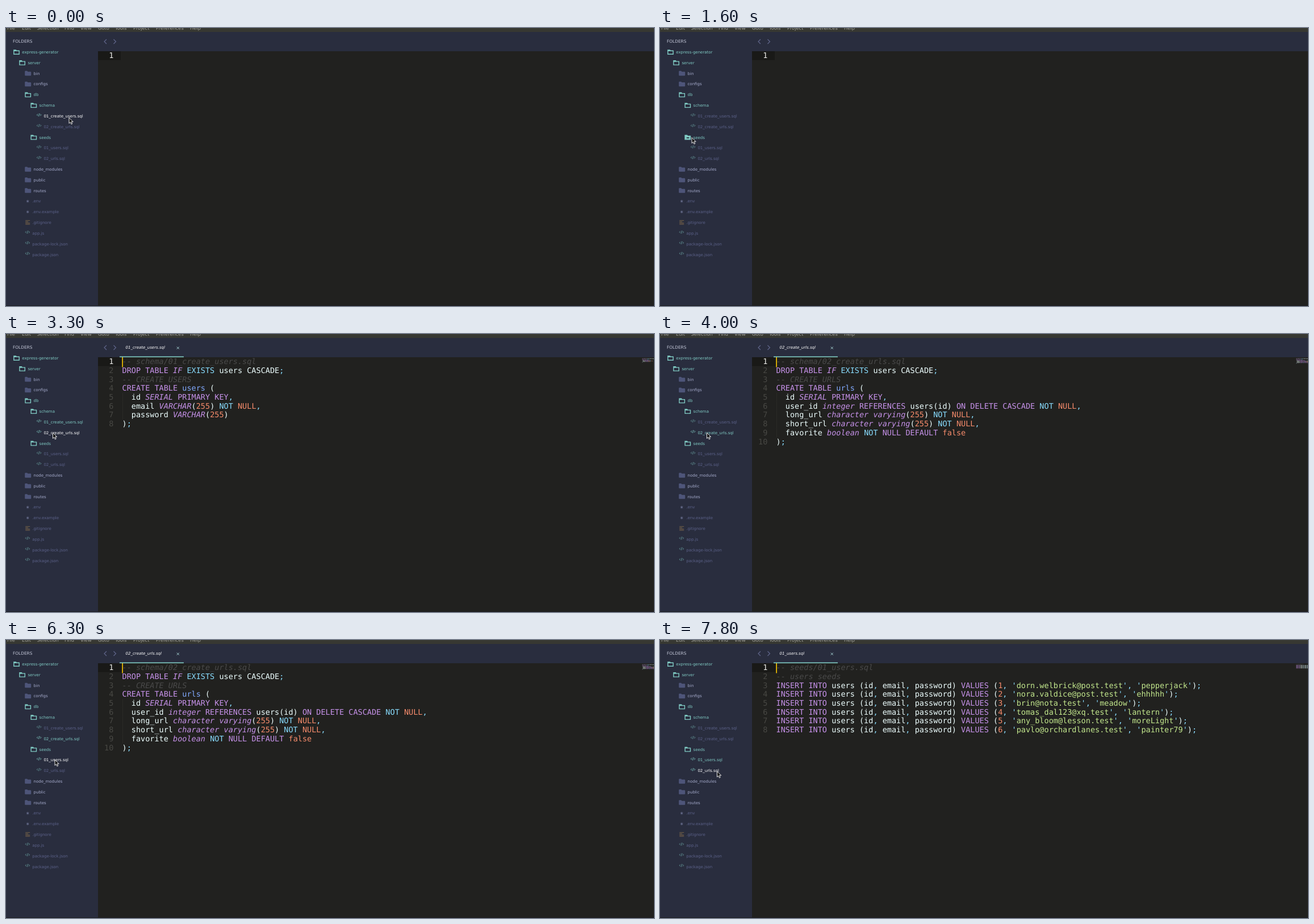
An HTML page for the animation above (8 s loop, 1141 by 491 pixels).

```html
<!DOCTYPE html>
<html lang="en">
<head>
<meta charset="utf-8">
<title>Browsing SQL files</title>
<style>
  html, body { margin: 0; width: 100%; height: 100%; overflow: hidden; background: #21211f; }
  svg { display: block; width: 100vw; height: 100vh; }
  text { white-space: pre; text-rendering: geometricPrecision; font: 7px "DejaVu Sans", sans-serif; }
  .menu text { font-size: 8.3px; fill: #a3a39d; }
  .code text { font: 13.53px "DejaVu Sans Mono", monospace; fill: #eeffff; }
  .code .number { fill: #484844; text-anchor: end; }
  .code .number.active { fill: #eeeeea; }
  .code .comment { fill: #4a4a4a; font-style: italic; }
  .code .type { fill: #c792ea; font-style: italic; }
  .keyword { fill: #c792ea; }
  .operator { fill: #89ddff; }
  .constant { fill: #f78c6c; }
  .name { fill: #82aaff; }
  .string { fill: #c3e88d; }
  .minimap { opacity: .5; fill: #eeffff; }
  .minimap .type { fill: #c792ea; }
  .minimap .comment { fill: #4a4a4a; }
  .folder text { fill: #a6accd; }
  .folder .icon { fill: #4e5579; }
  .open text { fill: #80cbc4; }
  .open .icon { fill: none; stroke: #80cbc4; stroke-width: 1.4; }
  .open .minus { fill: #292d3e; visibility: hidden; }
  .open.hover .icon { fill: #80cbc4; }
  .open.hover .minus { visibility: visible; }
  .file text { fill: #5c628a; }
  .file .icon { fill: none; stroke: #80cbc4; stroke-width: .9; opacity: .7; }
  .file.hover text { fill: #fff; }
  .file.selected text { fill: #80cbc4; }
  .file.hover .icon, .file.selected .icon { opacity: 1; }
  .file .gear { stroke: #8087ad; }
  .file .lines { stroke: #b08a50; }
</style>
</head>
<body>
<svg id="stage" viewBox="0 0 1141 491" preserveAspectRatio="none">
  <rect width="1141" height="491" fill="#21211f"/>
  <rect width="1141" height="41" fill="#292d3e"/>
  <rect width="162" height="491" fill="#292d3e"/>
  <rect width="1141" height="7" fill="#373832"/>
  <rect y="490" width="1141" height="1" fill="#1b1c20"/>
  <g class="menu" id="menu"></g>
  <text x="12" y="26.2" style="font-size:7.4px" fill="#c3c7d8">FOLDERS</text>
  <path d="M177 20l-4 4 4 4M189.500 20l4 4-4 4" fill="none" stroke="#5f658a" stroke-width="1.2"/>
  <g id="tree"></g>
  <rect id="gutter" x="162" y="41" height="15.7" fill="#191917"/>
  <g id="emptyLine" class="code"><text class="number active" x="189.300" y="53.200">1</text></g>
  <g id="files"></g>
  <rect id="caret" x="204.300" y="41" width="1.600" height="17.500" fill="#ffcc00"/>
  <g id="tab">
    <text id="tabTitle" x="210.500" y="26.300" fill="#fff" style="font-style:italic"></text>
    <path d="M300.800 22.600l4 4m0-4l-4 4" stroke="#a9d8d8" stroke-width="1"/>
    <rect x="200" y="39.500" width="113" height="1.600" fill="#80cbc4"/>
  </g>
  <path id="arrow" d="M.5.5v10l2.300-2.200 1.700 3.700 1.700-.8-1.700-3.500h3.200z" fill="#111" stroke="#fff" stroke-width=".9"/>
  <path id="beam" d="M-2.500-5.500h2l.5.500.5-.5h2M0-5v10M-2.500 5.500h2l.5-.5.5.5h2" fill="none" stroke="#ddd" stroke-width="1.100"/>
</svg>
<script>
const $ = id => document.getElementById(id);

function add(parent, tag, attributes = {}, content = "") {
  const node = document.createElementNS("http://www.w3.org/2000/svg", tag);
  for (const key in attributes) node.setAttribute(key, attributes[key]);
  node.textContent = content;
  return parent.appendChild(node);
}

const menu = { File: 2, Edit: 28, Selection: 54.500, Find: 103, View: 131, Goto: 162, Tools: 192, Project: 224, Preferences: 264, Help: 324 };
for (const label in menu) add($("menu"), "text", { x: menu[label], y: 2.800 }, label);

// Sidebar: depth, kind, label
const ROW_TOP = 42.5, ROW_STEP = 18.82;
const ICONS = {
  open: "M.8.7h3.500l1.200 1.400h4.700v6H.8zM1 2.100h9",
  folder: "M0 1q0-1 1-1h3l1.300 1.300h4.700q1 0 1 1v5.200q0 1-1 1h-9q-1 0-1-1z",
  code: "M2.700.700l-1.700 1.700 1.700 1.700M6.700.700l1.700 1.700-1.700 1.700M5.400-.2l-1.300 5.200",
  gear: "M5 1.800v5M2.800 3l4.400 2.600M7.200 3l-4.400 2.600",
  lines: "M1 .8h8M1 3h5M1 5.200h8M1 7.400h8"
};
const rows = `0 open express-generator
1 open server
2 folder bin
2 folder configs
2 open db
3 open schema
4 code 01_create_users.sql
4 code 02_create_urls.sql
3 open seeds
4 code 01_users.sql
4 code 02_urls.sql
2 folder node_modules
2 folder public
2 folder routes
2 gear .env
2 gear .env.example
2 lines .gitignore
2 code app.js
2 code package-lock.json
2 code package.json`.split("\n").map((line, i) => {
  const [depth, kind, label] = line.split(" ");
  const isFolder = kind === "open" || kind === "folder";
  const x = 13 + 10.100 * depth, y = ROW_TOP + ROW_STEP * i;
  const node = add($("tree"), "g", { class: isFolder ? "folder " + kind : "file" });
  const icon = add(node, "g", { transform: `translate(${x} ${y - 4.300})` });
  add(icon, "path", { class: "icon " + kind, d: ICONS[kind] });
  if (kind === "open") add(icon, "rect", { class: "minus", x: 3.500, y: 4.300, width: 4.500, height: 1.700 });
  add(node, "text", { x: x + (isFolder ? 15.300 : 13), y: y + 2.500 }, label);
  return { node, label };
});

const SOURCES = {
  "01_create_users.sql": `-- schema/01_create_users.sql
DROP TABLE IF EXISTS users CASCADE;
-- CREATE USERS
CREATE TABLE users (
  id SERIAL PRIMARY KEY,
  email VARCHAR(255) NOT NULL,
  password VARCHAR(255)
);`,
  "02_create_urls.sql": `-- schema/02_create_urls.sql
DROP TABLE IF EXISTS users CASCADE;
-- CREATE URLS
CREATE TABLE urls (
  id SERIAL PRIMARY KEY,
  user_id integer REFERENCES users(id) ON DELETE CASCADE NOT NULL,
  long_url character varying(255) NOT NULL,
  short_url character varying(255) NOT NULL,
  favorite boolean NOT NULL DEFAULT false
);`,
  "01_users.sql": ["-- seeds/01_users.sql", "-- users seeds", ...[
    ["dorn.welbrick@post.test", "pepperjack"],
    ["nora.valdice@post.test", "ehhhhh"],
    ["brin@nota.test", "meadow"],
    ["tomas_dal123@xq.test", "lantern"],
    ["any_bloom@lesson.test", "moreLight"],
    ["pavlo@orchardlanes.test", "painter79"]
  ].map(([email, word], i) => `INSERT INTO users (id, email, password) VALUES (${i + 1}, '${email}', '${word}');`)].join("\n")
};

const SYNTAX = /(?<comment>--.*)|(?<string>(?<=')[\w.@]+(?='))|(?<type>\b(?:IF|SERIAL|VARCHAR|integer|boolean|character varying)\b)|(?<operator>\b(?:EXISTS|NOT)\b|[,;'])|(?<name>(?<=CREATE TABLE )\w+)|(?<keyword>DROP TABLE|CREATE TABLE|PRIMARY KEY|REFERENCES|ON DELETE CASCADE|NULL(?= DEFAULT)|DEFAULT|INSERT INTO|VALUES)|(?<constant>NULL|false|\b\d+\b)/g;

function tokenize(line) {
  const tokens = [];
  let end = 0;
  for (const match of line.matchAll(SYNTAX)) {
    tokens.push(["plain", line.slice(end, match.index), end]);
    tokens.push([Object.keys(match.groups).find(kind => match.groups[kind]), match[0], match.index]);
    end = match.index + match[0].length;
  }
  tokens.push(["plain", line.slice(end), end]);
  return tokens.filter(([, value]) => value);
}

function buildFile(source) {
  const file = add($("files"), "g");
  const code = add(file, "g", { class: "code" });
  const minimap = add(file, "g", { class: "minimap" });
  source.split("\n").forEach((line, i) => {
    const top = 41 + 15.700 * i, y = top + 12.200;
    add(code, "text", { class: i ? "number" : "number active", x: 189.300, y }, i + 1);
    if (line.startsWith("  ")) add(code, "rect", { x: 205, y: top, width: .8, height: 15.700, fill: "#2d2d2a" });
    const text = add(code, "text", { x: 204.500, y });
    for (const [kind, value, column] of tokenize(line)) {
      add(text, "tspan", { class: kind }, value);
      for (const word of value.matchAll(/\S+/g))
        add(minimap, "rect", { class: kind, x: 1120 + .64 * (column + word.index), y: 42.300 + i, width: .64 * word[0].length, height: .9 });
    }
  });
  return file;
}
const files = Object.fromEntries(Object.entries(SOURCES).map(([name, source]) => [name, buildFile(source)]));

// Pointer path: time, x, y
const PATH = [
  [0, 110.500, 158], [800, 110.500, 158], [1100, 88, 131], [1400, 62, 165], [1600, 55.500, 193],
  [1900, 55.500, 193], [2100, 72, 157], [2700, 72, 157], [3000, 79, 170], [3200, 79, 170],
  [3300, 82, 174], [4700, 82, 174], [4800, 100, 160], [5000, 215, 75], [5100, 245, 52],
  [5300, 245, 52], [5500, 267.500, 82], [5700, 267.500, 82], [6000, 155, 150], [6300, 85.500, 211],
  [6800, 85.500, 211], [7000, 135, 150], [7200, 238, 70], [7400, 224, 148], [7500, 224, 148], [7800, 100, 231.500]
];

function pointerAt(time) {
  const next = PATH.findIndex(point => point[0] > time);
  const [t1, x1, y1] = PATH[next < 0 ? PATH.length - 1 : next - 1];
  if (next < 0) return [x1, y1];
  const [t2, x2, y2] = PATH[next];
  const k = (time - t1) / (t2 - t1);
  return [x1 + (x2 - x1) * k, y1 + (y2 - y1) * k];
}

function openFileAt(time) {
  if (time < 2200) return "";
  if (time < 4000) return "01_create_users.sql";
  return time < 6600 ? "02_create_urls.sql" : "01_users.sql";
}

const show = (node, visible) => node.style.display = visible ? "" : "none";

function draw(now) {
  const time = Math.floor(now % 8000 / 100) * 100;
  const current = openFileAt(time);
  const [x, y] = pointerAt(time);
  const inSidebar = x < 162;
  const hovered = inSidebar ? Math.round((y - ROW_TOP) / ROW_STEP) : -1;

  rows.forEach(({ node, label }, i) => {
    node.classList.toggle("hover", i === hovered);
    node.classList.toggle("selected", label === current);
  });
  for (const name in files) show(files[name], name === current);
  show($("emptyLine"), !current);
  show($("caret"), current);
  $("gutter").setAttribute("width", current ? 43 : 40);
  show($("tab"), time >= 2500);
  $("tabTitle").textContent = current;

  show($("arrow"), inSidebar);
  show($("beam"), !inSidebar);
  $(inSidebar ? "arrow" : "beam").setAttribute("transform", `translate(${x} ${y})`);
}

const start = performance.now();
function frame() {
  draw(performance.now() - start);
  requestAnimationFrame(frame);
}
frame();
</script>
</body>
</html>
```
